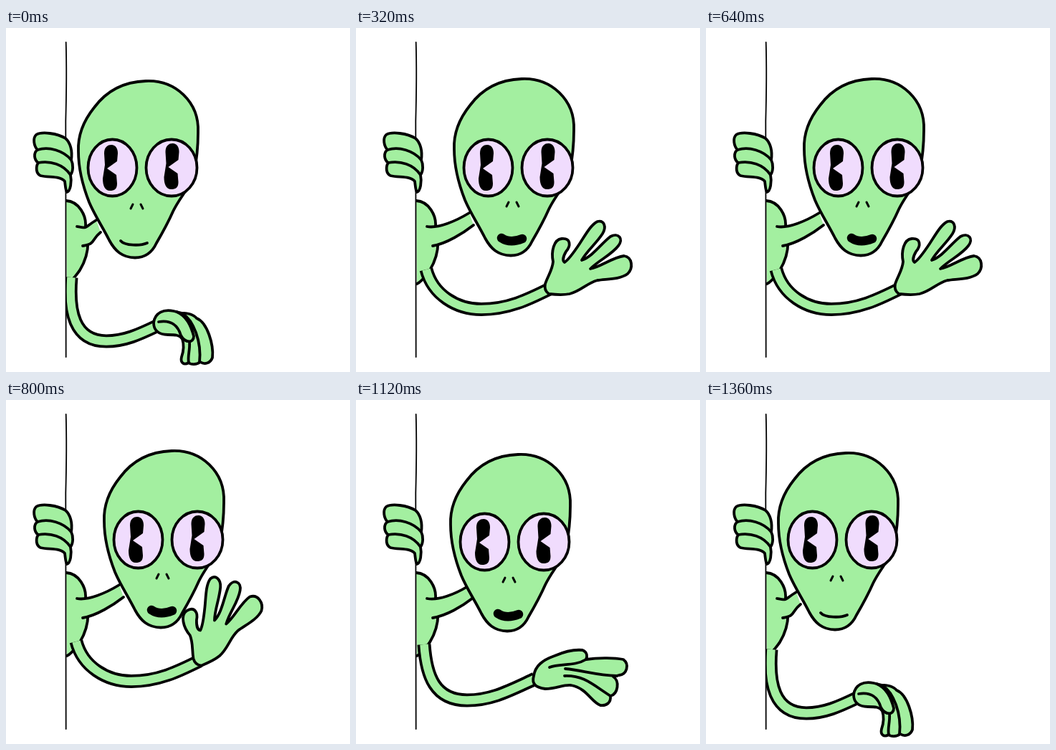
These frames come from a looping animation (480x480 px, 1610 ms). An HTML page with a canvas:

```html
<!DOCTYPE html>
<html lang="en">
<head>
<meta charset="utf-8">
<title>Waving alien</title>
<style>
html, body { margin: 0; height: 100%; overflow: hidden; background: #fff; }
canvas { display: block; width: 480px; height: 480px; }
</style>
</head>
<body>
<canvas id="stage" width="480" height="480"></canvas>
<script>
const ctx = document.getElementById('stage').getContext('2d');
const SKIN = '#a3efa0', EYE = '#f0dcfd', INK = '#000';
const STEP = 80, LOOP = 1610;

// Key poses: head x, head y, eye y, neck x, neck y, then the arm's two joined curves
const poses = [
  [0, 0, 0, 126, 268, 91, 348, 87, 395, 95, 437, 140, 437, 165, 437, 185, 428, 212, 415],
  [26, 4, 0, 148, 252, 92, 346, 88, 395, 98, 427, 142, 427, 175, 428, 200, 413, 236, 402],
  [31, 2, 1, 156, 260, 95, 341, 98, 385, 110, 419, 155, 419, 190, 419, 215, 405, 250, 389],
  [36, -3, 3, 158, 258, 98, 337, 107, 372, 140, 392.5, 175, 392.5, 212, 392.5, 240, 379, 270, 364]
];

const hands = [
  ['M206 411C208 397 220 392 234 395L246 398C252 397 262 400 266 405C281 411 290 442 288 460C285 468 277 470 271 466C266 470 258 470 255 467C248 471 243 467 245 459C248 450 249 443 246 434C242 428 236 428 226 428C213 428 206 422 206 411Z',
   'M213 410C230 407 240 415 244 429C250 440 262 440 262 430C258 415 252 402 238 396M246 398C262 408 273 438 270 466M256 438C257 450 253 458 255 467'],
  ['M231 404C232 388 248 377 268 376C286 376 296 381 301 388C322 389 340 401 347 418C349 430 342 435 333 432L326 430C328 443 320 451 311 450L307 447C307 457 296 459 290 453C288 444 293 436 290 429C288 420 283 415 272 416C256 419 236 418 231 404Z',
   'M254 395C268 389 276 405 288 409C299 410 302 396 297 387M300 402C312 408 320 420 326 431M294 409C306 421 309 436 309 449'],
  ['M248 385C250 371 260 363 277 357C291 351 306 348 316 349C323 352 323 358 321 362C340 359 362 360 373 362C382 369 378 383 367 384L359 386C368 392 366 410 355 413C356 422 350 427 341 426C328 421 322 402 300 398C288 397 280 403 264 403C250 401 245 396 248 385Z',
   'M270 373C284 367 305 372 321 362M292 375C315 377 335 384 364 385M291 385C318 384 330 397 355 413'],
  ['M264 357C268 345 274 338 275 326C272 312 276 295 287 294C300 293 300 304 293 312C289 319 288 325 291 327C297 323 306 310 312 301C320 289 328 274 337 270C346 268 350 277 344 287C335 301 322 311 315 324C330 319 343 300 355 291C366 285 374 294 366 304C356 317 340 323 327 336C342 333 358 320 374 318C386 320 387 335 379 343C368 351 350 350 337 352C322 356 314 367 298 371C288 373 278 372 269 371Q262 366 264 357Z', '']
];

// Pose position and hand turn in degrees for every step
const wave = [[3, 0], [3, -14], [3, -28], [3, -14]];
const steps = [[0, 0], [1, 0], [2, 0], [2.7, 14], ...wave, ...wave, [3, 0],
  [2.7, 14], [2, 0], [1, 0], [0.25, 0], [0, 0]];

function shape(d, fill, width = 3.8) {
  const path = new Path2D(d);
  if (fill) {
    ctx.fillStyle = fill;
    ctx.fill(path);
  }
  if (width) {
    ctx.strokeStyle = INK;
    ctx.lineWidth = width;
    ctx.stroke(path);
  }
}

function openEye(x, rx, pupilX, pupilY) {
  shape(`M${x - rx} 195a${rx} 39.5 0 1 1 ${2 * rx} 0a${rx} 39.5 0 1 1 ${-2 * rx} 0Z`, EYE);
  ctx.save();
  ctx.translate(pupilX, pupilY);
  shape('M-8 -20C-8 -29 -3 -32 2 -32C8 -32 11 -27 11 -20L10 -9L-4 1L9 10L10 22C10 30 6 32 0 32C-7 32 -10 25 -10 15L-7 -4Z', INK, 0);
  ctx.restore();
}

function drawBody(neckX, neckY) {
  shape('M84 241C102 242 112 262 111 276C118 300 114 320 103 338C97 346 92 354 85 357', SKIN);
  const top = `M99 277C115 280 ${neckX - 18} ${neckY + 11} ${neckX} ${neckY}`;
  const endX = neckX + 6, endY = neckY + 17;
  const midX = neckX - 8, midY = neckY + 28;
  shape(`${top}L${endX} ${endY}C${midX} ${midY} 126 301 107 304Z`, SKIN, 0);
  shape(`${top}M107 304C126 301 ${midX} ${midY} ${endX} ${endY}`);
}

function drawArm(a) {
  const path = new Path2D(`M${a[0]} ${a[1]}C${a.slice(2, 8).join(' ')} ${a.slice(8).join(' ')}`);
  ctx.lineCap = 'butt';
  for (const [color, width] of [[INK, 19], [SKIN, 11.5]]) {
    ctx.strokeStyle = color;
    ctx.lineWidth = width;
    ctx.stroke(path);
  }
  ctx.lineCap = 'round';
}

function drawHand(key, x, y, turn) {
  const [homeX, homeY] = poses[key].slice(-2);
  ctx.save();
  ctx.translate(x, y);
  ctx.rotate(turn * Math.PI / 180);
  ctx.translate(-homeX, -homeY);
  shape(hands[key][0], SKIN);
  shape(hands[key][1]);
  ctx.restore();
}

function drawHead(key, x, y, eyeY) {
  ctx.save();
  ctx.translate(x, y);
  shape('M195 74C236 72 270 103 268 146C268 165 266 185 262 206C254 226 242 237 233 256C226 272 217 288 210 300C204 313 194 320.5 180 320.5C162 320 152 311 144 296C134 276 124 262 116 243C107 220 101 197 101 172C100 150 107 131 123 111C140 88 165 75 195 74Z', SKIN);
  shape('M177 246L174 252M188 246L191 252', null, 3);
  if (key === 0) shape('M160 297C166 304 188 304 197 300');
  else if (key === 1) shape('M161 297C169 302 186 302 196 300', null, 6);
  else shape('M167 296Q179 304 196 297', null, 12.5);

  ctx.translate(0, eyeY);
  if (key === 1) {
    shape('M124 167C134 152 162 152 176 169M112 196L182 195M118 220C126 236 158 242 173 223'
      + 'M207 166C216 153 249 153 260 171C265 181 265 196 263 206M193 195Q230 195 264 192M196 218C204 233 229 236 249 230', null, 3);
  } else {
    openEye(148.5, 34, 145, 195);
    openEye(231, 35.5, 230.5, 193);
  }
  ctx.restore();
}

function drawGrip() {
  shape('M83.7 20Q85 65 83.3 130L83.7 459', null, 1.8);
  shape('M83 154C72 147 50 144 42 149C37 154 39 165 44 170C38 174 39 184 45 188C41 194 42 203 48 206C60 209 76 206 82 214C83 221 83 226 85 229C90 228 92 214 90 205C94 200 94 190 91 184C93 172 90 160 83 154Z', SKIN);
  shape('M44 170C60 165 80 171 91 184M45 188C62 185 80 190 90 205');
}

function draw() {
  const time = performance.now() % LOOP;
  const [at, turn] = steps[Math.min(steps.length - 1, Math.floor(time / STEP))];
  const from = Math.min(2, Math.floor(at));
  const pose = poses[from].map((v, i) => v + (poses[from + 1][i] - v) * (at - from));
  const [headX, headY, eyeY, neckX, neckY, ...arm] = pose;
  const key = Math.round(at);

  ctx.fillStyle = '#fff';
  ctx.fillRect(0, 0, 480, 480);
  ctx.lineCap = ctx.lineJoin = 'round';
  ctx.save();
  ctx.beginPath();
  ctx.rect(83, 0, 397, 480);
  ctx.clip();
  drawBody(neckX, neckY);
  drawArm(arm);
  drawHand(key, ...arm.slice(-2), turn);
  drawHead(key, headX, headY, eyeY);
  ctx.restore();
  drawGrip();
  requestAnimationFrame(draw);
}
draw();
</script>
</body>
</html>
```
